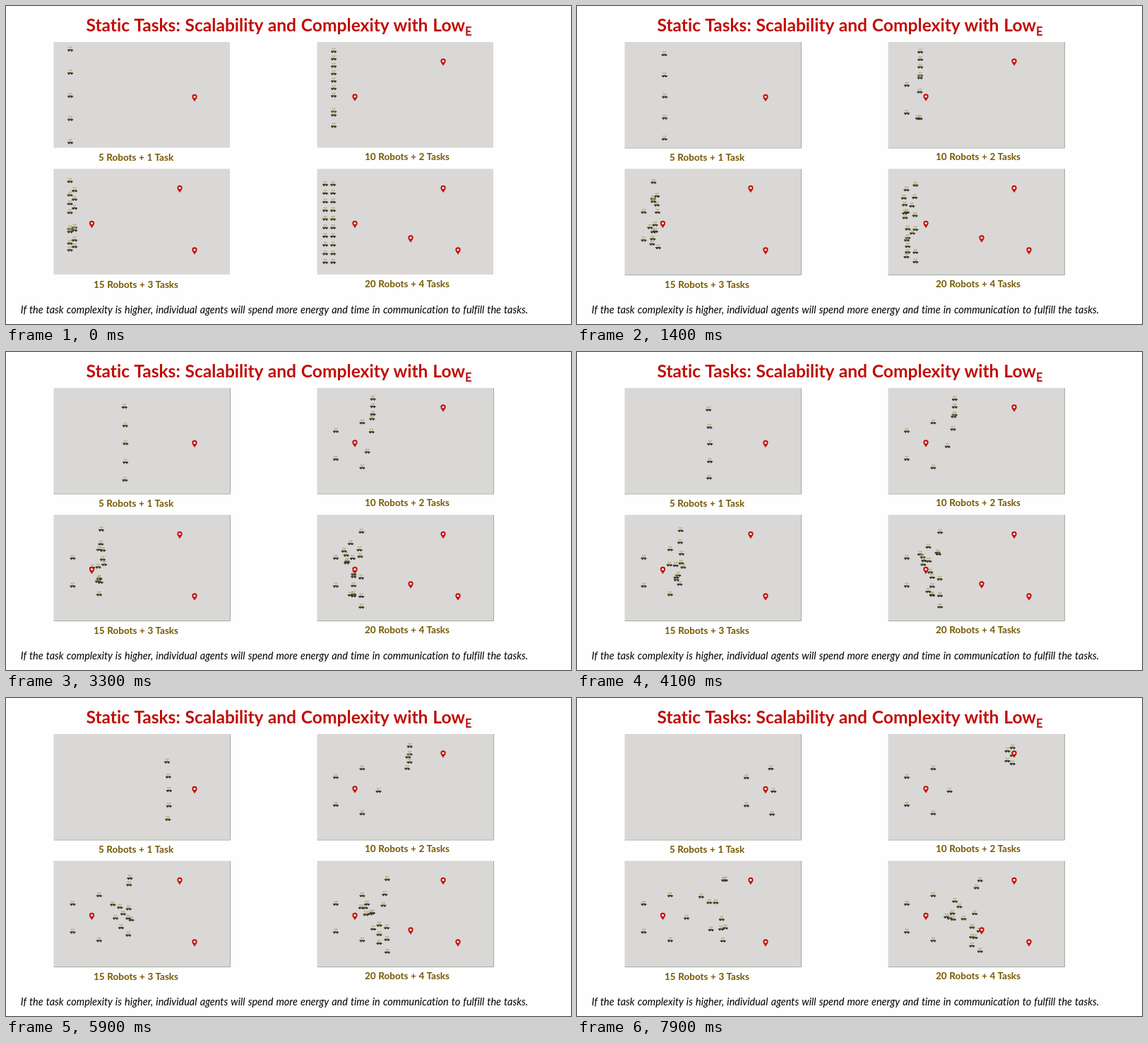
Recreate the animation shown at these times as an HTML page. Size 800 px wide and 450 px high, loop 8 s.

```html
<!DOCTYPE html>
<html lang="en">
<head>
<meta charset="utf-8">
<title>Static Tasks</title>
<style>
  html, body { margin: 0; height: 100%; overflow: hidden; background: #fefefe; }
  svg { display: block; width: 800px; height: 450px; font-family: Lato, "Open Sans", sans-serif; }
  text { text-anchor: middle; font-variant-ligatures: none; }
  .title { font-size: 24.6px; font-weight: 700; fill: #c00d08; word-spacing: .8px; }
  .caption { font-size: 13.5px; font-weight: 700; fill: #765800; word-spacing: .3px; }
  .note { font-size: 14.45px; font-style: italic; fill: #000; word-spacing: .8px; }
</style>
</head>
<body>
<svg id="stage" viewBox="0 0 800 450">
  <defs>
    <g id="robot">
      <path d="M-2.4-3.4h1.9v1.7h-1.9zM.5-3.4h1.9v1.7H.5z" fill="#b3a763"/>
      <path d="M-3.8.2H3.4V1H4.2V2.2H-3.8z" fill="#424235"/>
      <path d="M-1-.6h2v1.1h-2z" fill="#989156"/>
      <circle cx="-1.8" cy="2.4" r="1" fill="#2b2b23"/>
      <circle cx="2" cy="2.4" r="1" fill="#2b2b23"/>
    </g>
    <g id="pin">
      <path d="M0 5.2C-1.2 2.6-3.7 1-3.7-1.5A3.7 3.7 0 0 1 3.7-1.5C3.7 1 1.2 2.6 0 5.2Z" fill="#c4140c"/>
      <circle cy="-1.5" r="1.6" fill="#fff"/>
    </g>
  </defs>
  <text class="title" x="386.5" y="35.5">Static Tasks: Scalability and Complexity with Low<tspan font-size="16.5" dy="6.5">E</tspan></text>
  <text class="note" x="380" y="435">If the task complexity is higher, individual agents will spend more energy and time in communication to fulfill the tasks.</text>
</svg>
<script>
const LOOP = 8000, STEP = 100;
const WIDE = 33.5, TIGHT = 12;  // ring radius around the first task and the others
const HELD_UP = 0.78;           // pace of robots that have to dodge others

// runs: [robots, first y, last y] of the starting columns, abreast in each row.
// goals: task letter and place on its ring of five; "~" marks a held-up robot.
// speed in px/s, gain in px/s².
const panels = [
  { x: 67.5, y: 51, label: "5 Robots + 1 Task", labelY: 218.5,
    tasks: { A: [267, 130] },
    columns: [91], abreast: 1, runs: [[5, 61, 192]],
    goals: "A4 A3 A0 A2 A1",
    speed: 23.7, gain: 0 },
  { x: 440.5, y: 51, label: "10 Robots + 2 Tasks", labelY: 217.5,
    tasks: { A: [494, 129.5], B: [619, 79.5] },
    columns: [464], abreast: 1, runs: [[7, 63, 126], [2, 148, 153], [1, 169, 169]],
    goals: "B4 B0 B1 A4 B3 A3 B2 A2 A1 A0",
    speed: 15, gain: 0.55 },
  { x: 67.5, y: 230.5, label: "15 Robots + 3 Tasks", labelY: 398.5,
    tasks: { A: [121.5, 309], B: [246, 259], C: [267, 346.5] },
    columns: [90.5, 97], abreast: 1, runs: [[1, 247, 247], [6, 260, 291], [4, 312, 318], [4, 330, 344]],
    goals: "B0 C0 A4 C1 B4 C3 A3 B1~ C2 C4~ B3~ A2 A0 A1 B2",
    speed: 12.3, gain: 0.36 },
  { x: 440.5, y: 230.5, label: "20 Robots + 4 Tasks", labelY: 397.5,
    tasks: { A: [494, 309], B: [619, 259], C: [573, 329.5], D: [640, 346.5] },
    columns: [452, 463], abreast: 2, runs: [[20, 251.5, 361.5]],
    goals: "A4 B0 C1~ D4 C4~ A0~ D3~ A3 B1~ B4 C3 C0 D0 B2~ D1 A2 A1 C2 B1 D2",
    speed: 11.2, gain: 0.31 }
];

const stage = document.getElementById("stage");
function add(tag, attrs, text = "") {
  const el = document.createElementNS(stage.namespaceURI, tag);
  for (const name in attrs) el.setAttribute(name, attrs[name]);
  el.textContent = text;
  return stage.appendChild(el);
}

const mix = (a, b, k) => a + (b - a) * k;

function startRows({ runs, abreast }) {
  return runs.flatMap(([count, first, last]) => {
    const gaps = Math.max(1, count / abreast - 1);
    return Array.from({ length: count }, (_, i) => mix(first, last, Math.floor(i / abreast) / gaps));
  });
}

function ringPlace(tasks, task, place) {
  const angle = place * Math.PI * 2 / 5;
  const radius = task === "A" ? WIDE : TIGHT;
  const [x, y] = tasks[task];
  return [x + radius * Math.cos(angle), y + 1.3 + radius * Math.sin(angle)];
}

const robots = [], edges = [];

for (const p of panels) {
  add("rect", { x: p.x, y: p.y, width: 249.5, height: 149.5, fill: "#d9d8d6" });
  edges.push(add("path", { d: `M${p.x} ${p.y + 150}h250v-150`, fill: "none", stroke: "#9fada0" }));
  add("text", { class: "caption", x: p.x + 117, y: p.labelY }, p.label).setAttribute("x", p.x + (p.x > 400 ? 127.5 : 116.5));

  const rows = startRows(p);
  p.goals.split(" ").forEach(([task, place, held], i) => {
    const x = p.columns[i % p.columns.length], y = rows[i];
    const [goalX, goalY] = ringPlace(p.tasks, task, place);
    const length = Math.hypot(goalX - x, goalY - y);
    const el = add("use", { href: "#robot" });
    robots.push(s => {
      const travelled = (p.speed + p.gain * s) * s * (held ? HELD_UP : 1);
      const k = Math.min(1, travelled / length);
      el.setAttribute("transform", `translate(${mix(x, goalX, k)} ${mix(y, goalY, k)})`);
    });
  });

  for (const [x, y] of Object.values(p.tasks)) add("use", { href: "#pin", x, y });
}

function draw(now) {
  const t = Math.floor((now % LOOP) / STEP) * STEP;
  for (const move of robots) move(t / 1000);
  for (const edge of edges) edge.setAttribute("opacity", t ? 1 : 0);
  requestAnimationFrame(draw);
}
draw(0);
</script>
</body>
</html>
```
